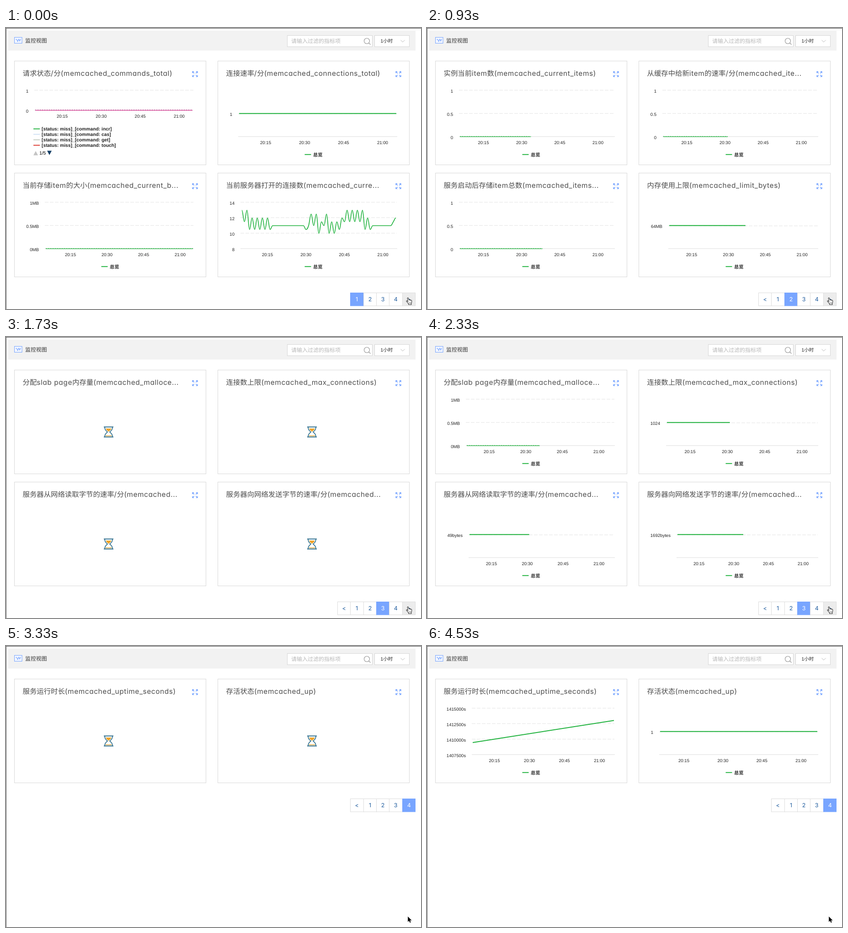
Recreate the animation shown at these times as an HTML page. Size 908x617 px, loop 5.33 s.

```html
<!DOCTYPE html>
<html lang="zh">
<head>
<meta charset="utf-8">
<title>监控视图</title>
<style>
html, body { margin: 0; width: 100%; height: 100%; overflow: hidden; background: #fff; }
svg { display: block; }
text { font-family: "Liberation Sans", "Noto Sans CJK SC", "Noto Sans CJK", sans-serif; text-rendering: geometricPrecision; }
.cjk { font-family: "Noto Sans CJK SC", "Noto Sans CJK", sans-serif; }
.title { font-size: 15.4px; fill: #4c4c4c; }
.latin { font-family: Inter, sans-serif; letter-spacing: .6px; font-feature-settings: "cv11"; }
.axis { font-size: 9.6px; fill: #222; }
.legend { font-size: 10.3px; font-weight: bold; fill: #222; }
.page { font: 12.5px Inter, sans-serif; text-anchor: middle; }
</style>
</head>
<body>
<svg id="stage" width="908" height="617" viewBox="0 0 908 617" fill="none"></svg>
<script>
const LOOP = 5330, RIGHT = 411, GREEN = '#20b23e', BLUE = '#78a5ff';
const stage = document.getElementById('stage');

// One value per minute, in half units above 10
const wave = '6361414141412' + '2'.repeat(12) + '12525032503031436363636141' + '2'.repeat(8) + '34';

// chart: title, plot left, first time label, label step, y labels, extras
const pages = [
  { at: 0, next: true, charts: [
    ['请求状态/分(memcached_commands_total)', 62, 123, 85.3, '1 0', { bottom: 181, multi: true }],
    ['连接速率/分(memcached_connections_total)', 63, 123, 85.3, '1'],
    ['当前存储item的大小(memcached_current_b...', 85, 141, 80, '1MB 0.5MB 0MB'],
    ['当前服务器打开的连接数(memcached_curre...', 68, 127, 84.2, '14 12 10 8', { wave: true }]] },
  { at: 330, prev: true, next: true, starts: [458, 485, 411, 424], charts: [
    ['实例当前item数(memcached_current_items)', 70, 123.5, 83.5, '1 0.5 0'],
    ['从缓存中给新item的速率/分(memcached_ite...', 70, 123.5, 83.5, '1 0.5 0'],
    ['服务启动后存储item总数(memcached_items...', 70, 123.5, 83.5, '1 0.5 0'],
    ['内存使用上限(memcached_limit_bytes)', 83, 134, 80.6, '64MB']] },
  { at: 1730, prev: true, next: true, starts: [1836, 1885, 1888, 1852], charts: [
    ['分配slab page内存量(memcached_malloce...', 85, 136, 80, '1MB 0.5MB 0MB'],
    ['连接数上限(memcached_max_connections)', 78, 130.5, 81.7, '1024'],
    ['服务器从网络读取字节的速率/分(memcached...', 91, 141, 78.4, '49bytes'],
    ['服务器向网络发送字节的速率/分(memcached...', 101, 150, 76, '1692bytes']] },
  { at: 3330, prev: true, starts: [3525, 3528], charts: [
    ['服务运行时长(memcached_uptime_seconds)', 98, 147.5, 76.6, '1415000s 1412500s 1410000s 1407500s', { slope: [212, 163.5] }],
    ['存活状态(memcached_up)', 63, 117, 85.4, '1']] }
];

const path = (d, stroke, width = 1, more = '') =>
  `<path d="${d}" stroke="${stroke}" stroke-width="${width}" ${more}/>`;
const shape = (d, fill) => `<path d="${d}" fill="${fill}"/>`;
const rect = (x, y, w, h, fill, stroke = 'none') =>
  `<rect x="${x}" y="${y}" width="${w}" height="${h}" fill="${fill}" stroke="${stroke}"/>`;
const text = (x, y, s, cls, more = '') => `<text x="${x}" y="${y}" class="${cls}" ${more}>${s}</text>`;
const move = (x, y, s) => `<g transform="translate(${x} ${y})">${s}</g>`;

const header =
  rect(5, 6, 891, 43.5, '#f2f2f2') +
  rect(0, 0, 908, 1, '#444') + rect(0, 0, 1, 617, '#666') +
  rect(18.5, 20.5, 16.5, 13, '#f2f6ff', BLUE) +
  path('M21 25h2.5l2 4.5 2.5-5 2 4 2-4.5', BLUE, 1.2) +
  text(42, 32, '监控视图', 'cjk', 'font-size="11.9" fill="#333"') +
  rect(615.5, 16.5, 186, 24.5, '#fff', '#d6d6d6') +
  text(624, 33, '请输入过滤的指标项', 'cjk', 'font-size="12" fill="#b8b8b8"') +
  '<circle cx="789.5" cy="28.5" r="6" stroke="#999" stroke-width="1.2"/>' +
  path('M794 33l3.5 3.5', '#999', 1.3) +
  rect(806.5, 16.5, 76, 24.5, '#fff', '#d6d6d6') +
  text(819.5, 32, '1小时', '', 'font-size="10.4" fill="#222"') +
  path('M863.5 26.5l4.5 4.5 4.5-4.5', '#bbb');

const expandIcon = move(413.5, 101.3, [0, 90, 180, 270].map(a =>
  `<g transform="rotate(${a})">${shape('M-6.2-6.2h4.6l-4.6 4.6z', BLUE)}${path('M-5-5l3.3 3.3', BLUE, 1.5)}</g>`).join(''));

const hourglass = move(224.5, 208.6,
  shape('M-6-7.5h12c-.8 3-3 4.5-6 7c-3-2.5-5.2-4-6-7z', '#f0a32a') +
  path('M-6.5 8.3h13', '#f0a32a', 1.4) +
  path('M-8.5-11c0 5.5 2 7.500 6 11c-4 3.500-6 5.500-6 11M8.500-11c0 5.500-2 7.500-6 11c4 3.500 6 5.500 6 11', '#34728f', 1.8) +
  path('M-10.5-11h21M-10.5 11h21', '#34728f', 2));

const hand = move(875, 592, path('M3.2 1.6c-.2-1.4 1.6-1.9 2.1-.5l1.3 4.2c.2-1 2-1 2.2.2.4-.9 1.9-.7 2 .4.6-.7 1.9-.2 1.9.9.3 2.7 0 4.4-.9 6v2.7h-6v-2c-1.6-1.5-2.8-3.3-4.6-5.2-.8-1 .5-2 1.5-1.2l1.8 1.6z',
  '#333', 1.1, 'fill="#fff"') + path('M7 10.5v3M8.8 10.5v3M10.5 10.5v3', '#444', .7));
const arrow = path('M879.2 594v11.8l2.7-2.5 1.8 4.2 2-.8-1.8-4.1h3.7z', '#fff', 1.2, 'fill="#000" paint-order="stroke"');

function wavePath() {
  const pts = [...wave].map((v, i) => [71 + i * 5.617, 205 - v * 8.5]);
  const rise = i => {
    if (!pts[i - 1] || !pts[i + 1]) return 0;
    const a = pts[i][1] - pts[i - 1][1], b = pts[i + 1][1] - pts[i][1];
    return a * b > 0 ? (a + b) / 2 * .4 : 0;
  };
  return 'M' + pts[0] + pts.slice(1).map(([x, y], i) => {
    const [px, py] = pts[i];
    return `C${px + 2.25} ${py + rise(i)} ${x - 2.25} ${y - rise(i + 1)} ${x} ${y}`;
  }).join('');
}

const legendLine = (x, y, color) => path(`M${x} ${y}h14`, color, 1.9);

function legend(multi) {
  if (!multi) return legendLine(208.5, 277.8, GREEN) + text(227, 281.5, '总览', 'legend');
  const names = ['incr', 'cas', 'get', 'touch'], colors = [GREEN, '#cfe0f4', '#c3cbc0', '#dc352c'];
  return names.map((n, i) => legendLine(60, 221.5 + 12 * i, colors[i]) +
    text(78, 225 + 12 * i, `[status: miss]_[command: ${n}]`, 'legend')).join('') +
    shape('M60 279.5l5-9.5 5 9.5z', '#c4c4c4') + shape('M90 269.5h10l-5 9.5z', '#153f66') +
    text(73, 278, '1/5', '', 'font-size="10.3" fill="#000"');
}

function series(left, y, onAxis, opt, done) {
  if (opt.wave) return path(wavePath(), GREEN, 1.7);
  const from = left + 2, full = 409 - (opt.multi ? 1 : 0);
  const tip = Math.min(full, left + done * (RIGHT - left));
  if (tip <= from) return '';
  const [y1, y2] = opt.slope || [y - .2, y - .2];
  if (!onAxis || opt.slope)
    return path(`M${from} ${y1}L${tip} ${y1 + (y2 - y1) * (tip - from) / (full - from)}`, GREEN, 1.9);
  const color = opt.multi ? '#d62a86' : GREEN;
  return path(`M${from} ${y - .4}H${tip}`, color, 1.4) +
    path(`M${from} ${y - 1}H${tip}`, opt.multi ? '#93307c' : '#2a9a40', 1.2, 'stroke-dasharray="2 3"');
}

function chart([, left, x0, step, labels, opt = {}], done) {
  const names = labels.split(' '), last = names.length - 1, bottom = opt.bottom || 239;
  let out = path(`M${left} ${bottom - .5}H${RIGHT - (opt.multi ? 2 : 0)}`, '#dedede'), y;
  names.forEach((name, i) => {
    y = last ? 137 + (bottom - 137) * i / last : 188;
    if (!last || i < last)
      out += path(`M${left} ${Math.round(y) - .5 + (last ? 0 : 1)}H${RIGHT - 1}`, '#e4e4e4', 1, 'stroke-dasharray="8 3"');
    out += text(left - 13, y + 4.7, name, 'axis', 'text-anchor="end"');
  });
  ['20:15', '20:30', '20:45', '21:00'].forEach((s, i) =>
    out += text(x0 + i * step, bottom + 16, s, 'axis', 'text-anchor="middle"'));
  return out + series(left, y, last > 0, opt, done) + legend(opt.multi);
}

function card(def, start, now) {
  const title = def[0].replace(/[ -~]+/g, s => `<tspan class="latin">${s}</tspan>`);
  const t = Math.min(1, (now - start) / 1000);
  return rect(18.5, 72.5, 419, 228, '#fff', '#d8d8d8') + text(36.5, 105, title, 'cjk title') + expandIcon +
    (t < 0 ? hourglass : chart(def, .5 - .5 * Math.cos(Math.PI * t)));
}

function pager(page, active) {
  const cells = [...(page.prev ? ['&lt;'] : []), 1, 2, 3, 4, ...(page.next ? ['&gt;'] : [])];
  const w = 28.33, y = page.charts.length > 2 ? 581.5 : 335.5;
  const x = i => Math.floor(895.5 - w * (cells.length - i)) + .5;
  return cells.map((s, i) => {
    const on = s === active;
    return rect(x(i), y, x(i + 1) - x(i), 28.5, on ? BLUE : s === '&gt;' ? '#ececec' : '#fff', on ? BLUE : '#dcdcdc') +
      text(x(i) + w / 2, y + 18.5, s, 'page', `fill="${on ? '#fff' : '#1f5c9e'}"`);
  }).join('');
}

function render(now) {
  const index = pages.findLastIndex(p => now >= p.at), page = pages[index];
  stage.innerHTML = header +
    page.charts.map((def, i) => move(i % 2 * 445, i > 1 ? 246 : 0,
      card(def, page.starts ? page.starts[i] : -1000, now))).join('') +
    pager(page, index + 1) + (page.next ? hand : arrow);
}

// The picture refreshes 15 times a second
let shown = -1;
function tick() {
  const t = performance.now() % LOOP, m = t % 200;
  const step = Math.floor(t / 200) * 3 + (m >= 70) + (m >= 130);
  if (step !== shown) render((shown = step) * 200 / 3);
  requestAnimationFrame(tick);
}
tick();
</script>
</body>
</html>
```
